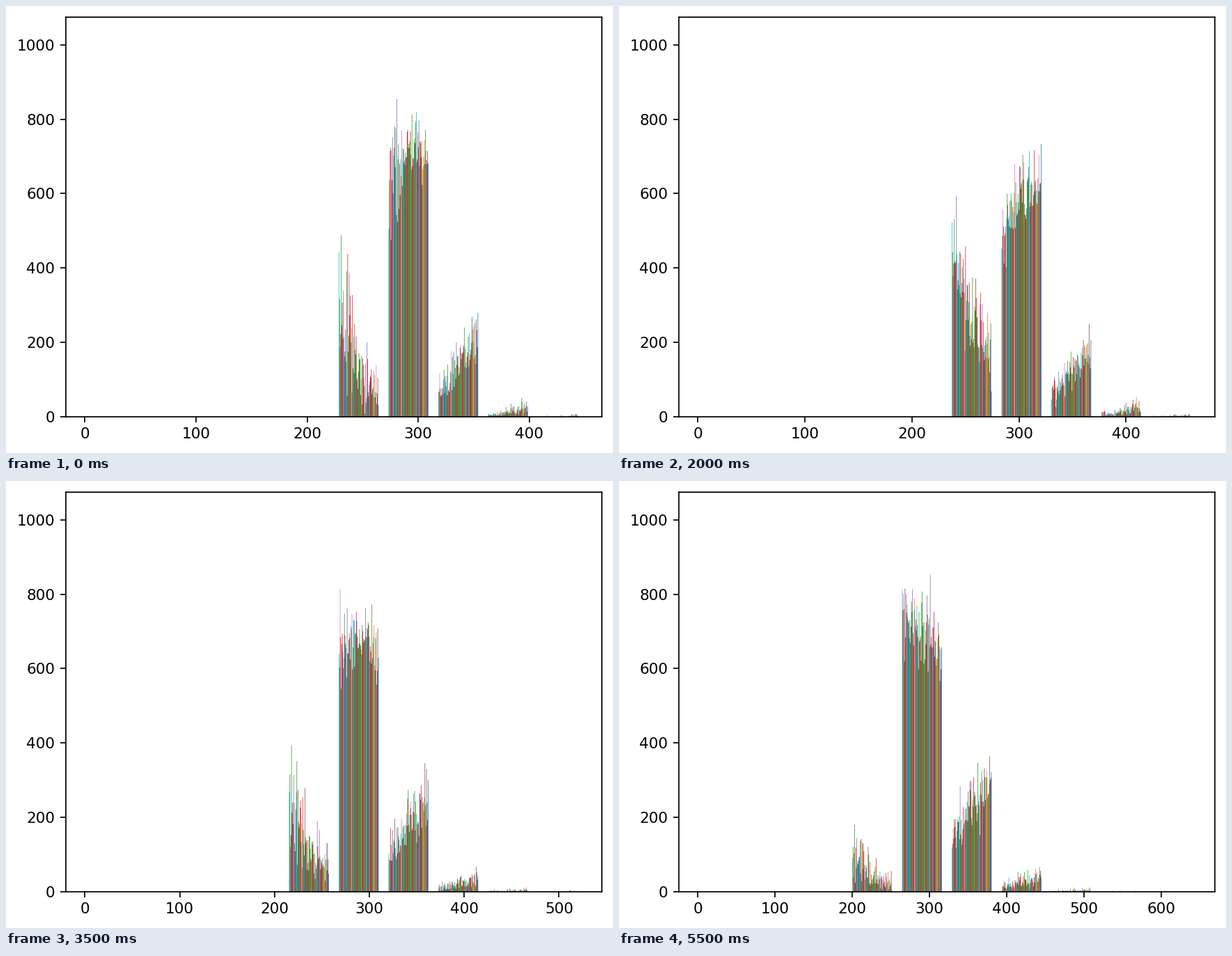
Animation, 872 px wide and 642 px high, one loop 8 s. Source, as a matplotlib script:

```python
import numpy as np
import matplotlib.pyplot as plt
from matplotlib.animation import FuncAnimation
from matplotlib.colors import to_rgb
from matplotlib.ticker import MultipleLocator

W, H, DPI = 872, 642, 160
LEFT, RIGHT, TOP, BOTTOM = 85.6, 856.3, 15.6, 589.9
K = 155.4 / DPI
ROWS = 1024                 # values counted in each series
YMAX = 1.05 * ROWS
BINS, SERIES = 10, 74
PAD = 0.39                  # side margin, in bins
PX_BIN = (RIGHT - LEFT) / (BINS + 2 * PAD)
BAR = 0.8 * PX_BIN / SERIES

# bin width and centre of the values at each step
WIDTHS = [44.8, 49.4, 46, 52.8, 46.5, 49.75, 56.1, 52.5, 65.7, 64.3, 66.8, 64.5]
CENTRES = [271, 270, 274, 280, 274, 266, 272, 270, 270, 276, 272, 279]

plt.rcParams.update({
    "font.family": "DejaVu Sans", "font.size": 10 * K, "axes.linewidth": 0.8 * K,
})
for axis in "xtick", "ytick":
    plt.rcParams.update({f"{axis}.major.width": 0.8 * K,
                         f"{axis}.major.size": 3.5 * K,
                         f"{axis}.major.pad": 3.5 * K})

rng = np.random.default_rng(4)
u = np.linspace(0, 1, SERIES)
drift = u + 0.18 * np.sin(np.pi * u) ** 6
wobble = rng.normal(0, 1, SERIES)
palette = np.array([to_rgb(f"C{i}") for i in (3, 2, 1, 9, 5, 2, 4, 3, 0, 6)])
ink = 1 - palette[rng.integers(0, len(palette), SERIES)]


def counts(n):
    """Histogram of every series at step n, one row per bin."""
    rng = np.random.default_rng(100 + n)
    jitter = 3.2 * wobble + rng.normal(0, 2.4, SERIES)
    centre = CENTRES[n] + 17.5 * drift + jitter
    spread = (16.3 + 0.78 * n) * (1 + 0.17 * u) * np.exp(rng.normal(0, 0.1, SERIES))
    values = rng.gumbel(centre, spread, (ROWS, SERIES))
    which = np.floor(values / WIDTHS[n])
    return [(which == k).sum(axis=0) for k in range(BINS)]


xs = np.arange(W)[:, None]
ys = np.arange(H)[:, None]


def picture(n):
    """Thin bars, averaged over the area of each pixel."""
    img = np.ones((H, W, 3))
    for k, count in enumerate(counts(n)):
        lo = LEFT + (PAD + k + 0.1) * PX_BIN + BAR * np.arange(SERIES)
        share = np.clip(np.minimum(xs + 1, lo + BAR) - np.maximum(xs, lo), 0, 1)
        top = BOTTOM - count * (BOTTOM - TOP) / YMAX
        fill = np.clip(np.minimum(ys + 1, BOTTOM) - np.maximum(ys, top), 0, 1)
        for ch in range(3):
            img[:, :, ch] -= fill @ (share * ink[:, ch]).T
    return (np.clip(img, 0, 1) * 255).round().astype(np.uint8)


fig = plt.figure(figsize=(W / DPI, H / DPI), dpi=DPI, facecolor="white")
ax = fig.add_axes([LEFT / W, 1 - BOTTOM / H,
                   (RIGHT - LEFT) / W, (BOTTOM - TOP) / H])
ax.patch.set_visible(False)
ax.set_ylim(0, YMAX)
ax.xaxis.set_major_locator(MultipleLocator(100))
ax.yaxis.set_major_locator(MultipleLocator(200))
bars = fig.figimage(picture(0), origin="upper", zorder=-1)


def update(i):
    n = min(i, len(WIDTHS) - 1)
    ax.set_xlim(-PAD * WIDTHS[n], (BINS + PAD) * WIDTHS[n])
    bars.set_data(picture(n))
    return []


anim = FuncAnimation(fig, update, frames=16, interval=500, repeat=True,
                     repeat_delay=0, init_func=lambda: update(0))
plt.show()
```
